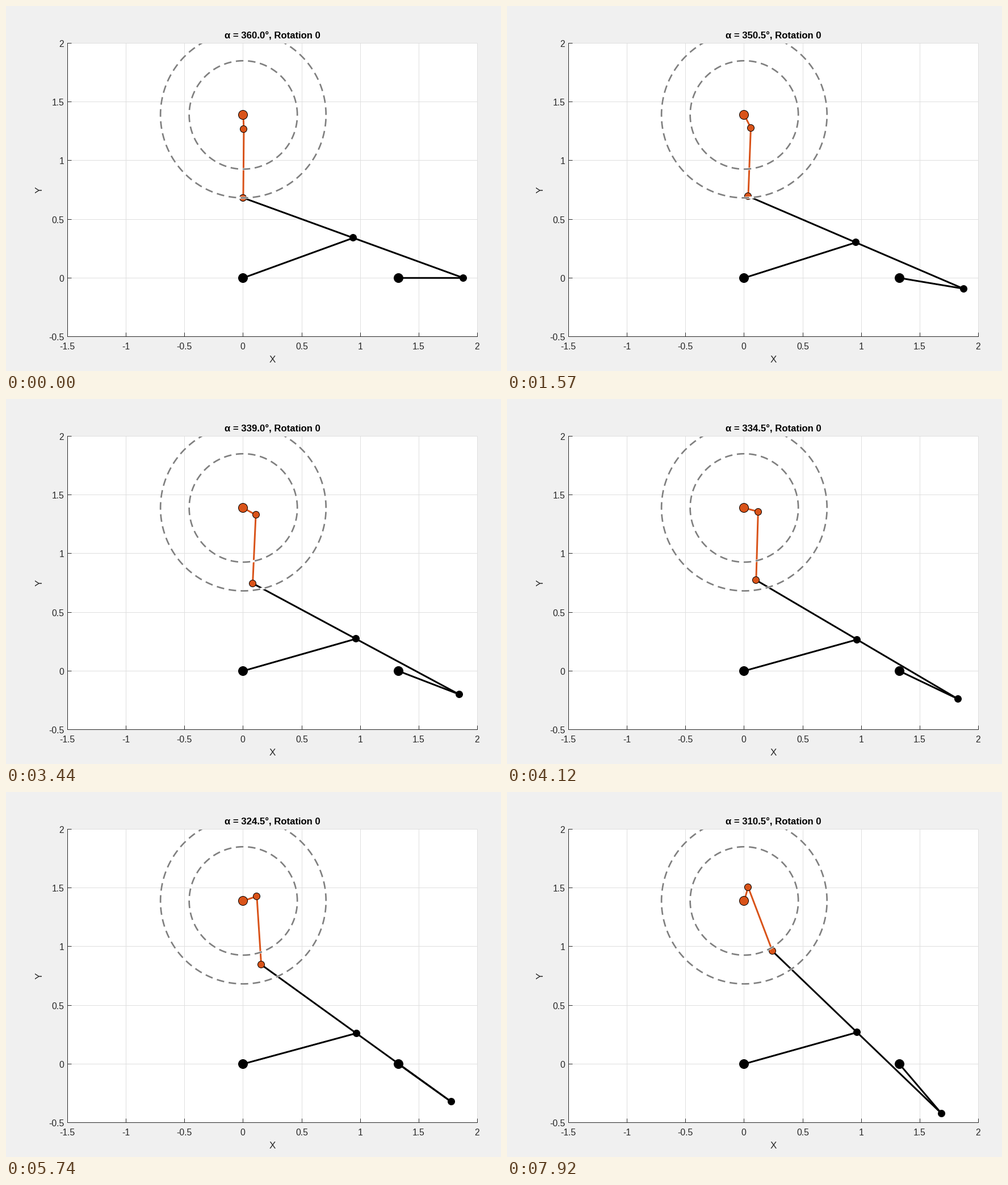
Recreate the animation shown at these times as a matplotlib script. Size 872 px wide and 642 px high, loop 7990 ms.

```python
import numpy as np
import matplotlib.pyplot as plt
from matplotlib.animation import FuncAnimation
from matplotlib.patches import Circle, Rectangle

W, H, DPI = 872, 642, 100
LOOP, STEP = 7990, 34
PT = 72 / DPI                      # points per pixel
LEFT, RIGHT, TOP, BOTTOM = 108.5, 830.5, 65.5, 581.5
INK, ORANGE, GRAY = "#262626", "#D95319", "#7F7F7F"

# Linkage sizes in plot units
CRANK_X, CRANK_R = 1.324, 0.556
HUB = np.array([0, 1.38902])
ARM, ROD = 0.1225, 0.5843

# Step counts and the times (ms) at which they are reached
COUNTS = [0, 1, 9, 10, 11, 21, 22, 29, 31, 32, 41, 42, 52, 53,
          59, 61, 62, 63, 73, 74, 84, 85, 95, 96, 99]
TIMES = [0, 120, 780, 850, 920, 1710, 1820, 2370, 2510, 2620, 3340, 3440, 4220, 4290,
         4760, 4900, 5000, 5100, 5880, 5950, 6730, 6830, 7610, 7680, 7920]
STARTS = np.interp(np.arange(100), COUNTS, TIMES)


def px(x):
    return LEFT + (np.asarray(x) + 1.5) / 3.5 * (RIGHT - LEFT)


def py(y):
    return TOP + (2 - np.asarray(y)) / 2.5 * (BOTTOM - TOP)


def pose(alpha):
    """Crank pin, rocker joint, coupler end and elbow for a crank angle."""
    a = np.radians(alpha)
    pin = np.array([CRANK_X + CRANK_R * np.cos(a), CRANK_R * np.sin(a)])
    d = np.hypot(*pin)
    normal = np.array([-pin[1], pin[0]]) / d
    joint = pin / 2 + normal * np.sqrt(1 - d * d / 4)
    end = 2 * joint - pin
    v = end - HUB
    r = np.hypot(*v)
    bend = np.arccos(np.clip((ARM**2 + r**2 - ROD**2) / (2 * ARM * r), -1, 1))
    t = np.arctan2(v[1], v[0]) + bend
    elbow = HUB + ARM * np.array([np.cos(t), np.sin(t)])
    return pin, joint, end, elbow


fig = plt.figure(figsize=(W / DPI, H / DPI), dpi=DPI, facecolor="#F0F0F0")
ax = fig.add_axes([0, 0, 1, 1])
ax.set_xlim(0, W)
ax.set_ylim(H, 0)
ax.axis("off")
plot_area = Rectangle((LEFT, TOP), RIGHT - LEFT, BOTTOM - TOP,
                      fc="white", ec="none", snap=False)
ax.add_patch(plot_area)


def stroke(xs, ys, color, width, z, cap="butt", **kw):
    return ax.plot(xs, ys, color=color, lw=width * PT, zorder=z, snap=False,
                   solid_capstyle=cap, dash_capstyle="butt", **kw)[0]


def label(x, y, s, size, color=INK, ha="center", va="baseline", **kw):
    return ax.text(x, y, s, fontsize=size * PT, color=color, ha=ha, va=va,
                   family="Liberation Sans", **kw)


def link(color, z):
    return stroke([], [], color, 3, z, solid_joinstyle="round")


def node(radius, color, z, at=(0, 0)):
    disc = Circle((0, 0), radius, fc=color, ec="black", lw=PT, zorder=z, snap=False)
    ax.add_patch(disc)
    move(disc, at)
    return disc


def move(disc, at):
    """Centre a disc on the pixel that holds the point."""
    disc.center = np.floor(px(at[0])) + 0.5, np.floor(py(at[1])) + 0.5


def place(line, *points):
    x, y = np.transpose(points)
    line.set_data(px(x), py(y))


# Grid, ticks and axis lines, each on whole pixels
for v in np.arange(-1.5, 2.1, 0.5):
    x = np.floor(px(v)) + 0.5
    stroke([x, x], [TOP, BOTTOM], "#DFDFDF", 1, 2)
    stroke([x, x], [BOTTOM - 7, BOTTOM], INK, 1, 3)
    label(x - 0.5, 604, f"{v:g}", 15.8)
for v in np.arange(-0.5, 2.1, 0.5):
    y = np.floor(py(v)) + 0.5
    stroke([LEFT, RIGHT], [y, y], "#DFDFDF", 1, 2)
    stroke([LEFT, LEFT + 7], [y, y], INK, 1, 3)
    label(102, y + 6.5, f"{v:g}", 15.8, ha="right")
stroke([LEFT, LEFT], [TOP, BOTTOM], INK, 1, 3, cap="projecting")
stroke([LEFT, RIGHT], [BOTTOM, BOTTOM], INK, 1, 3, cap="projecting")
label(469.5, 627, "X", 17)
label(59.5, 323.5, "Y", 17, rotation=90, va="center")
title = label(469.5, 58, "", 16.8, "black", weight="bold")

# Moving links
rocker, coupler, crank = (link("black", 4) for _ in range(3))
arm = link(ORANGE, 6)
node(8, "black", 5)
node(8, "black", 5, (CRANK_X, 0))
node(8, ORANGE, 7, HUB)
pin_dot, joint_dot = (node(6, "black", 5) for _ in range(2))
elbow_dot, end_dot = (node(6, ORANGE, 7) for _ in range(2))

# Reach limits: dashed rings on a white underlay
turn = np.radians(np.arange(0, 361, 2))
for radius in (ROD + ARM, ROD - ARM):
    xs = px(HUB[0] + radius * np.cos(turn))
    ys = py(HUB[1] + radius * np.sin(turn))
    under = stroke(xs, ys, "white", 4, 8)
    ring = stroke(xs, ys, GRAY, 8 / 3, 9, ls=(0, (5, 3)))
    under.set_clip_path(plot_area)
    ring.set_clip_path(plot_area)


def update(i):
    now = (i + 1) * STEP
    count = np.searchsorted(STARTS, now, side="right") - 1
    alpha = 360 - 0.5 * count
    pin, joint, end, elbow = pose(alpha)
    place(rocker, (0, 0), joint)
    place(coupler, pin, end)
    place(crank, (CRANK_X, 0), pin)
    place(arm, HUB, elbow, end)
    dots = pin_dot, joint_dot, elbow_dot, end_dot
    for dot, at in zip(dots, (pin, joint, elbow, end)):
        move(dot, at)
    title.set_text(f"α = {alpha:.1f}°, Rotation 0")
    return rocker, coupler, crank, arm, *dots, title


anim = FuncAnimation(fig, update, frames=LOOP // STEP, interval=STEP,
                     repeat=True, repeat_delay=0, blit=False)
plt.show()
```
